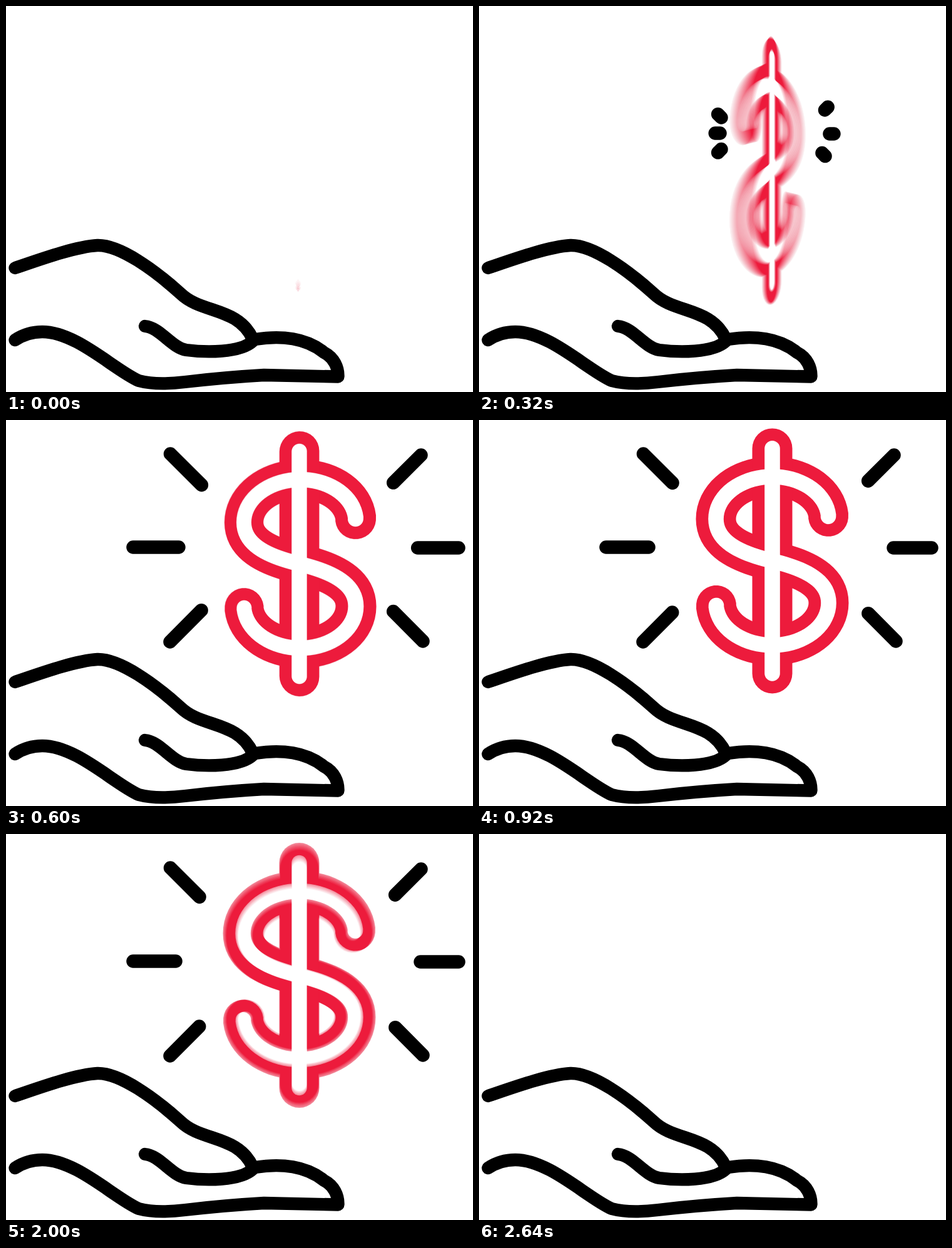
An HTML page with a canvas for the animation above (2680 ms loop, 746 px wide and 616 px high).

```html
<!DOCTYPE html>
<html lang="en">
<head>
<meta charset="utf-8">
<title>Hand and dollar</title>
<style>
  html, body { margin: 0; width: 100%; height: 100%; overflow: hidden; background: #fff; }
  svg, canvas { position: absolute; left: 0; top: 0; width: 746px; height: 616px; }
  svg { fill: none; stroke: #000; stroke-width: 20.3; stroke-linecap: round; stroke-linejoin: round; }
</style>
</head>
<body>
<canvas id="stage" width="746" height="616"></canvas>
<svg viewBox="0 0 746 616">
  <path d="M14.5 418 C50 406 110 384 146 382 C182 381 238 422 279 459 C312 491 370 480 394 531"/>
  <path d="M222 511 C246 513 264 545 288 549 C318 553 374 554 394 535"/>
  <path d="M398 532 C440 525 480 530 508 553 C524 561 531 577 530.5 591.5 L412 589 C360 592 320 596 286 600 C262 603 234 604 212 598 C172 580 112 520 58 520 C42 520 28 524 14.5 533"/>
</svg>
<script>
const W = 746, H = 616, LOOP = 2680, STEP = 40;
const SHUTTER = 20, SAMPLES = 16, DEPTH = 900;
const RED = '#ed1b3c';

const stage = document.getElementById('stage').getContext('2d');
const layer = document.createElement('canvas');
layer.width = W;
layer.height = H;
const ink = layer.getContext('2d');

const clamp = v => Math.max(0, Math.min(1, v));
const ramp = (t, a, b) => clamp((t - a) / (b - a));
const smooth = (t, a, b) => { const p = ramp(t, a, b); return p * p * (3 - 2 * p); };
const mix = (a, b, p) => a + (b - a) * p;

// Centre line of the S: the upper half, then its point reflection.
function sCurve() {
  const half = [[89.5, -71]];
  for (let i = 1; i <= 36; i++) {
    const a = Math.PI * i / 36;
    half.push([90 * Math.cos(a), -67 - 67.5 * Math.sin(a)]);
  }
  const bez = (u, a, b, c, d) => {
    const v = 1 - u;
    return v * v * v * a + 3 * v * v * u * b + 3 * v * u * u * c + u * u * u * d;
  };
  for (let i = 1; i <= 20; i++) {
    half.push([bez(i / 20, -90, -90, -45, 0), bez(i / 20, -67, -28, -11, 0)]);
  }
  return half.concat(half.slice(0, -1).reverse().map(([x, y]) => [-x, -y]));
}

// Polygon around a centre line with round ends.
function outline(line, r) {
  const side = pts => {
    const out = [];
    pts.forEach(([x, y], i) => {
      const p = pts[Math.max(0, i - 1)], q = pts[Math.min(pts.length - 1, i + 1)];
      const a = Math.atan2(q[1] - p[1], q[0] - p[0]);
      out.push([x - r * Math.sin(a), y + r * Math.cos(a)]);
      if (i === pts.length - 1) {
        for (let k = 1; k < 16; k++) {
          const b = a + Math.PI / 2 - Math.PI * k / 16;
          out.push([x + r * Math.cos(b), y + r * Math.sin(b)]);
        }
      }
    });
    return out;
  };
  return side(line).concat(side(line.slice().reverse()));
}

const lines = [sCurve(), [[0, -179.5], [0, 179.5]]];
const outer = lines.map(l => outline(l, 32));
const inner = lines.map(l => outline(l, 12.3));

function pose(t) {
  const lift = Math.exp(-Math.pow(Math.max(0, t) / 197, 1.2));
  const low = Math.max(lift, smooth(t, 2000, 2200));
  return {
    x: 468.5 - 2 * low,
    y: mix(224.5 + smooth(t, 1150, 1500), 452, low),
    scale: ramp(t, 0, 200) * (1 - ramp(t, 2000, 2200)),
    turn: 112 * Math.pow(Math.max(0, 800 - t) / 480, 3.3) * Math.PI / 180
  };
}

function fillShapes(shapes, { x, y, scale, turn }, color) {
  const c = Math.cos(turn), s = Math.sin(turn);
  ink.fillStyle = color;
  for (const shape of shapes) {
    ink.beginPath();
    for (const [px, py] of shape) {
      const k = scale * DEPTH / (DEPTH - px * s * scale);
      ink.lineTo(x + px * c * k, y + py * k);
    }
    ink.fill();
  }
}

// Motion blur: running average of poses around the time t.
function drawDollar(t) {
  for (let i = 0; i < SAMPLES; i++) {
    const p = pose(t + SHUTTER * ((i + 0.5) / SAMPLES - 0.5));
    ink.fillStyle = '#fff';
    ink.fillRect(0, 0, W, H);
    if (p.scale > 0) {
      fillShapes(outer, p, RED);
      fillShapes(inner, p, '#fff');
    }
    stage.globalAlpha = 1 / (i + 1);
    stage.drawImage(layer, 0, 0);
  }
  stage.globalAlpha = 1;
}

// Each ray: outer end, then the point it shoots out from.
const rays = [
  [262.5, 54, 387, 178], [203, 203, 385, 203], [262, 354, 387, 228.5],
  [663, 56, 552.5, 166], [723, 204, 560, 204], [666, 353, 548, 234.5]
];

function drawRays(t) {
  const tip = smooth(t, 283, 580) * (1 - smooth(t, 2040, 2240));
  const tail = 0.626 * smooth(t, 320, 640) * (1 - smooth(t, 2000, 2180));
  if (tip <= 0) return;
  stage.lineWidth = 21.5;
  stage.lineCap = 'round';
  stage.strokeStyle = '#000';
  stage.beginPath();
  for (const [ox, oy, sx, sy] of rays) {
    stage.moveTo(mix(sx, ox, tail), mix(sy, oy, tail));
    stage.lineTo(mix(sx, ox, tip), mix(sy, oy, tip));
  }
  stage.stroke();
}

const start = performance.now();
let last = -1;

function frame() {
  const now = Math.max(0, performance.now() - start) % LOOP;
  const t = Math.floor(now / STEP) * STEP;
  if (t !== last) {
    last = t;
    drawDollar(t);
    drawRays(t);
  }
  requestAnimationFrame(frame);
}
frame();
</script>
</body>
</html>
```
